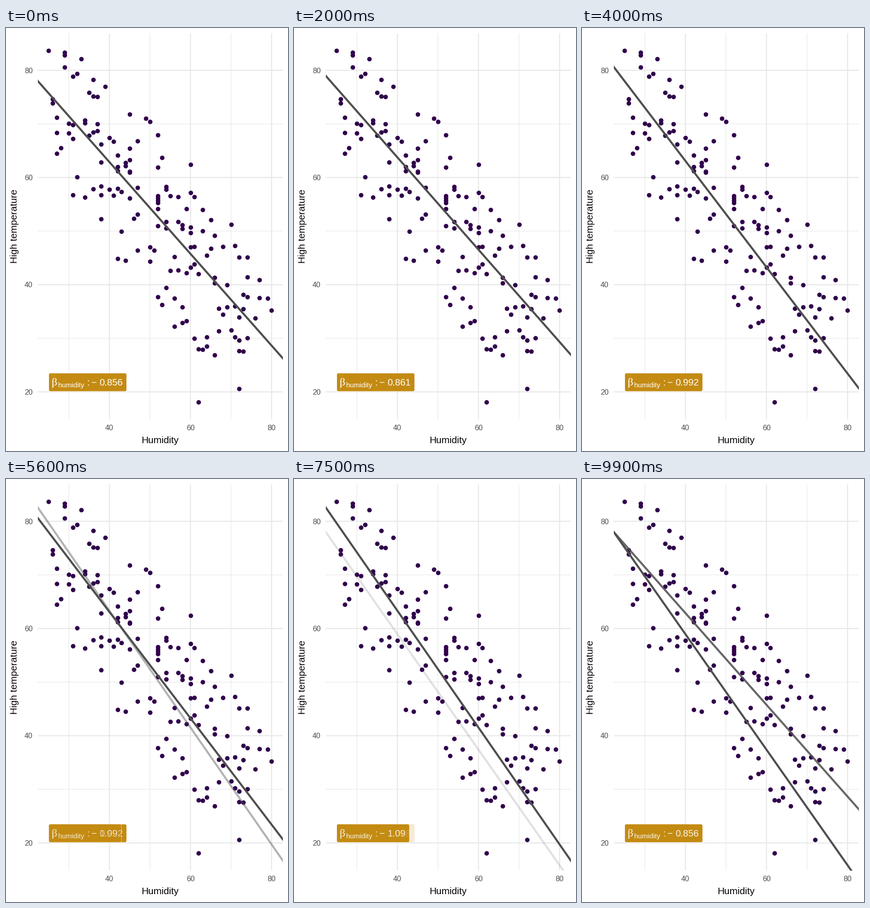
A matplotlib script that plays this animation: 611 px wide and 917 px high, repeating every 10000 ms.

```python
import matplotlib.pyplot as plt
from matplotlib.animation import FuncAnimation
from matplotlib.patches import FancyBboxPatch, Rectangle

W, H, DPI = 611, 917, 64
PX = 72 / DPI                      # points per pixel
LEFT, RIGHT, TOP, BOTTOM = 68.5, 599.5, 11.5, 848.5
X_UNIT, Y_UNIT = 8.785, 11.62      # pixels per data unit

PURPLE, GOLD, GREY, GRID = "#30004c", "#c48b12", "#4f4f4f", "#e8e8e8"

# Heights in pixels of the points, one row per humidity value from 25 up
ROWS = [
    [49], [154, 163], [194, 227, 272], [260], [53, 59, 85],
    [207, 228], [105, 210, 240, 362], [99, 323], [67], [200, 206, 367],
    [140, 233], [112, 147.5, 225.5, 349], [149, 208, 223],
    [252, 291, 343, 362, 414], [127],
    [238, 350], [246, 362.5], [275.5, 301, 310, 348, 500],
    [354.5, 440.5], [291.5, 299, 503.5],
    [186.5, 261, 286, 311, 313, 369], [413], [244.5, 346, 404, 481.5],
    [], [196],
    [203, 475, 506], [482], [232, 302, *range(364, 380, 5), 392, 429, 582.5],
    [281, 599.5], [344, 349.5, 420, 433.5, 563],
    [363.5, 526], [496, 586, 646.5], [366, 419.5, 524.5],
    [427, 435, 605, 639], [391.5, 531, 635],
    [295.5, 357, 432, 443.5, 474.5, 519], [366, 474, 512, 672.5],
    [533, 695.5, 810.5], [393.5, 440, 696.5], [493, 669.5, 690],
    [416, 478], [450, 541, 552.5, 708.5], [607.5, 657], [474, 621],
    [556.5, 605],
    [426, 654.5], [471.5, 603, 669.5], [497, 626.5, 677, 699.5, 782],
    [578, 608.5, 700.5], [497, 539.5, 582.5, 672],
    [], [629], [546, 585], [], [586], [612],
]

# Slope and height of the line at the left edge of the panel
STATES = [(-0.856, 114.5), (-0.861, 103.3), (-0.992, 84),
          (-1.09, 61.3), (-1.078, 114.5)]
# First frame of each fade and the frame where the next state stands alone
FADES = [(15, 20), (35, 40), (54, 60), (75, 80), (94, 100)]


def px(humidity):
    return 224 + (humidity - 40) * X_UNIT


def py(temp):
    return 91.7 + (80 - temp) * Y_UNIT


fig = plt.figure(figsize=(W / DPI, H / DPI), dpi=DPI, facecolor="white")
ax = fig.add_axes([0, 0, 1, 1])
ax.set(xlim=(0, W), ylim=(H, 0))
ax.axis("off")


def write(x, y, s, size, color, font="Liberation Sans", **kw):
    return ax.text(x, y, s, fontsize=size * PX, color=color, family=font, **kw)


def grid(values, width, vertical):
    for v in values:
        if vertical:
            xs, ys = [px(v)] * 2, [TOP, BOTTOM]
        else:
            xs, ys = [LEFT, RIGHT], [py(v)] * 2
        ax.plot(xs, ys, color=GRID, lw=width * PX, snap=False,
                solid_capstyle="butt", zorder=1)


grid([30, 50, 70], 1.2, True)
grid([30, 50, 70], 1.2, False)
grid([40, 60, 80], 2.3, True)
grid([20, 40, 60, 80], 2.3, False)

for v in (20, 40, 60, 80):
    write(58, py(v) + 6, str(v), 16, "#4d4d4d", ha="right")
    if v > 20:
        write(px(v), 871.7, str(v), 16, "#4d4d4d", ha="center")
write(333.7, 900, "Humidity", 20.8, "black", ha="center")
write(28, 430, "High temperature", 20.8, "black", rotation=90,
      ha="right", va="center", rotation_mode="default")

points = [(px(25 + i), y + 0.4) for i, row in enumerate(ROWS) for y in row]
ax.scatter(*zip(*points), s=(9.8 * PX) ** 2, color=PURPLE, linewidths=0,
           zorder=2)


class Layer:
    """A regression line with its slope label."""

    def __init__(self, z):
        self.line, = ax.plot([], [], color=GREY, lw=4.4 * PX, zorder=z)
        self.line.set_clip_path(Rectangle(
            (LEFT, TOP), RIGHT - LEFT, BOTTOM - TOP, transform=ax.transData))
        self.box = FancyBboxPatch(
            (92.5, 748), 169, 40, boxstyle="round,pad=0,rounding_size=4",
            fc=GOLD, ec="white", lw=1.1 * PX, zorder=z + 1)
        ax.add_patch(self.box)
        kw = dict(color="white", zorder=z + 2)
        self.value = write(202.5, 775, "", 20.2, **kw)
        self.parts = [
            self.line, self.box, self.value,
            write(99, 775, "β", 24, font="Liberation Serif", **kw),
            write(112.5, 779, "humidity", 15.1, **kw),
            write(175, 775, ":", 20.2, **kw),
            write(185.5, 775, "−", 20.2, **kw),
        ]

    def show(self, state, alpha):
        slope, y0 = state
        rise = -slope * Y_UNIT / X_UNIT
        xs = [LEFT - 20, RIGHT + 20]
        self.line.set_data(xs, [y0 + rise * (x - LEFT) for x in xs])
        label = f"{-slope:g}"
        self.value.set_text(label)
        self.box.set_width(169 - 11.3 * (5 - len(label)))
        for part in self.parts:
            part.set_alpha(alpha)


old, new = Layer(3), Layer(6)


def draw(frame):
    current = sum(frame >= end for _, end in FADES)
    start, end = FADES[current]
    alpha = max(0, (frame - start + 1) / (end - start + 1))
    old.show(STATES[current], 1)
    new.show(STATES[(current + 1) % len(STATES)], alpha)
    return old.parts + new.parts


anim = FuncAnimation(fig, draw, frames=100, interval=100, repeat=True,
                     repeat_delay=0, blit=False)
plt.show()
```
